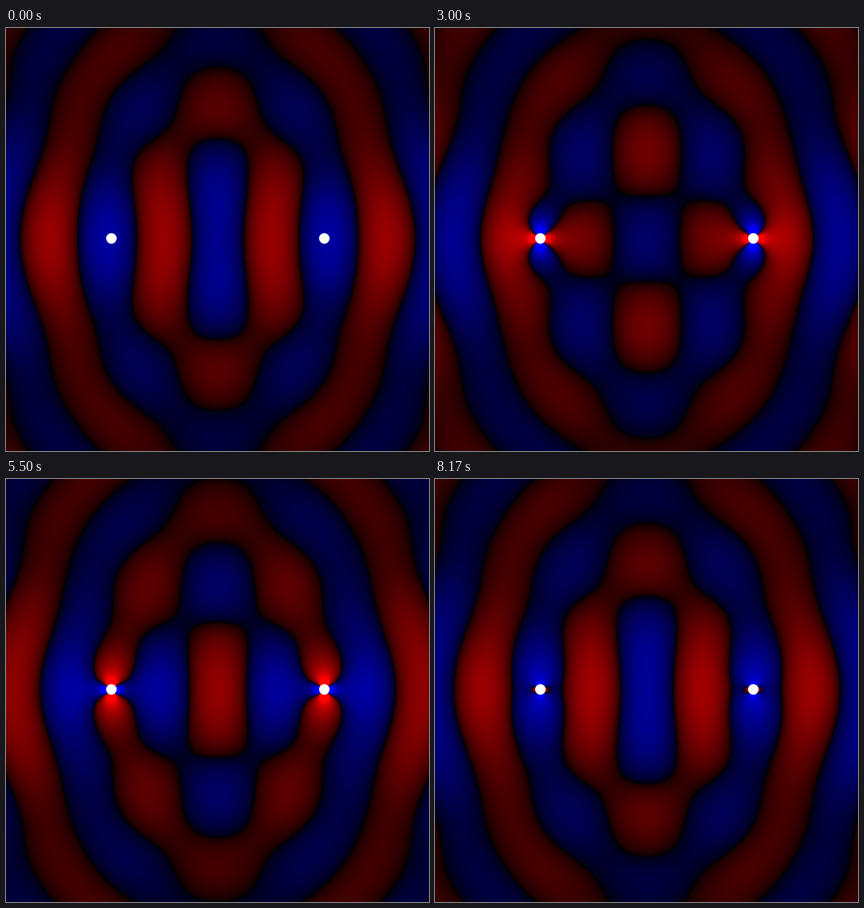
An HTML page with a canvas for the animation above (8.34 s loop, 600 by 600 pixels).

```html
<!DOCTYPE html>
<html lang="en">
<head>
<meta charset="utf-8">
<title>Two dipoles</title>
<style>
  html, body { margin: 0; width: 100%; height: 100%; overflow: hidden; background: #000; }
  canvas { display: block; width: 600px; height: 600px; }
</style>
</head>
<body>
<canvas id="stage" width="600" height="600"></canvas>
<script>
const SIZE = 600, LOOP = 8340, FRAMES = 50, PERIOD = 25;
const SOURCES = [149.5, 451.5], FIELD_Y = 299, DOT_Y = 298.5;
const K = 4 * Math.PI / (SOURCES[1] - SOURCES[0]);   // sources lie two wavelengths apart
const GAIN = 0.58;
const STEP = 0.5;                     // radial table spacing in pixels

const ctx = document.getElementById('stage').getContext('2d');
const img = ctx.createImageData(SIZE, SIZE);
const px = img.data;

// Power series for J0, J0', Y0, Y0'
function bessel(x) {
  const q = x * x / 4, log = Math.log(x / 2) + 0.5772156649015329;
  let term = 1, h = 0, j = 1, dj = 0, s = 0, ds = 0;
  for (let k = 1; k < 70; k++) {
    term *= -q / (k * k);
    h += 1 / k;
    const d = term * 2 * k / x;
    j += term;
    dj += d;
    s += h * term;
    ds += h * d;
  }
  const c = 2 / Math.PI;
  return [j, dj, c * (log * j - s), c * (j / x + log * dj - ds)];
}

const table = [];
for (let i = 0; i * STEP < 560; i++) table.push(bessel(K * Math.max(i * STEP, 1)));

// In-phase and quadrature parts of the summed vertical field
const inPhase = new Float32Array(SIZE * SIZE);
const quad = new Float32Array(SIZE * SIZE);

function addSource(sx) {
  for (let y = 0, p = 0; y < SIZE; y++) {
    const dy = y + 0.5 - FIELD_Y;
    for (let x = 0; x < SIZE; x++, p++) {
      const dx = x + 0.5 - sx;
      const r = Math.max(1, Math.hypot(dx, dy));
      const u = r / STEP, i = Math.floor(u), f = u - i;
      const a = table[i], b = table[i + 1];
      const at = n => a[n] + (b[n] - a[n]) * f;
      const cos2 = dy * dy / (r * r);
      const far = 1 - cos2, near = (1 - 2 * cos2) / (K * r);
      inPhase[p] += at(0) * far + at(1) * near;
      quad[p] += at(2) * far + at(3) * near;
    }
  }
}
SOURCES.forEach(addSource);
for (let p = 3; p < px.length; p += 4) px[p] = 255;

function draw(n) {
  const phase = 2 * Math.PI * n / PERIOD;
  const c = Math.cos(phase), s = Math.sin(phase);
  for (let i = 0, p = 0; i < inPhase.length; i++, p += 4) {
    const e = inPhase[i] * c + quad[i] * s;
    const v = Math.min(255, 255 * Math.sqrt(GAIN * Math.abs(e)));
    px[p] = e < 0 ? v : 0;
    px[p + 2] = e < 0 ? 0 : v;
  }
  ctx.putImageData(img, 0, 0);
  ctx.fillStyle = '#fff';
  for (const x of SOURCES) {
    ctx.beginPath();
    ctx.arc(x, DOT_Y, 7.5, 0, 2 * Math.PI);
    ctx.fill();
  }
}

// Frames start on multiples of 10 ms
const startOf = n => Math.round(n * 50 / 3) * 10;
function frameAt(t) {
  let n = Math.min(FRAMES - 1, Math.ceil(t * 3 / 500));
  while (n > 0 && startOf(n) > t) n--;
  return n;
}

let shown = 0;
draw(0);
const begin = performance.now();
function tick() {
  const n = frameAt((performance.now() - begin) % LOOP);
  if (n !== shown) draw(shown = n);
  requestAnimationFrame(tick);
}
requestAnimationFrame(tick);
</script>
</body>
</html>
```
